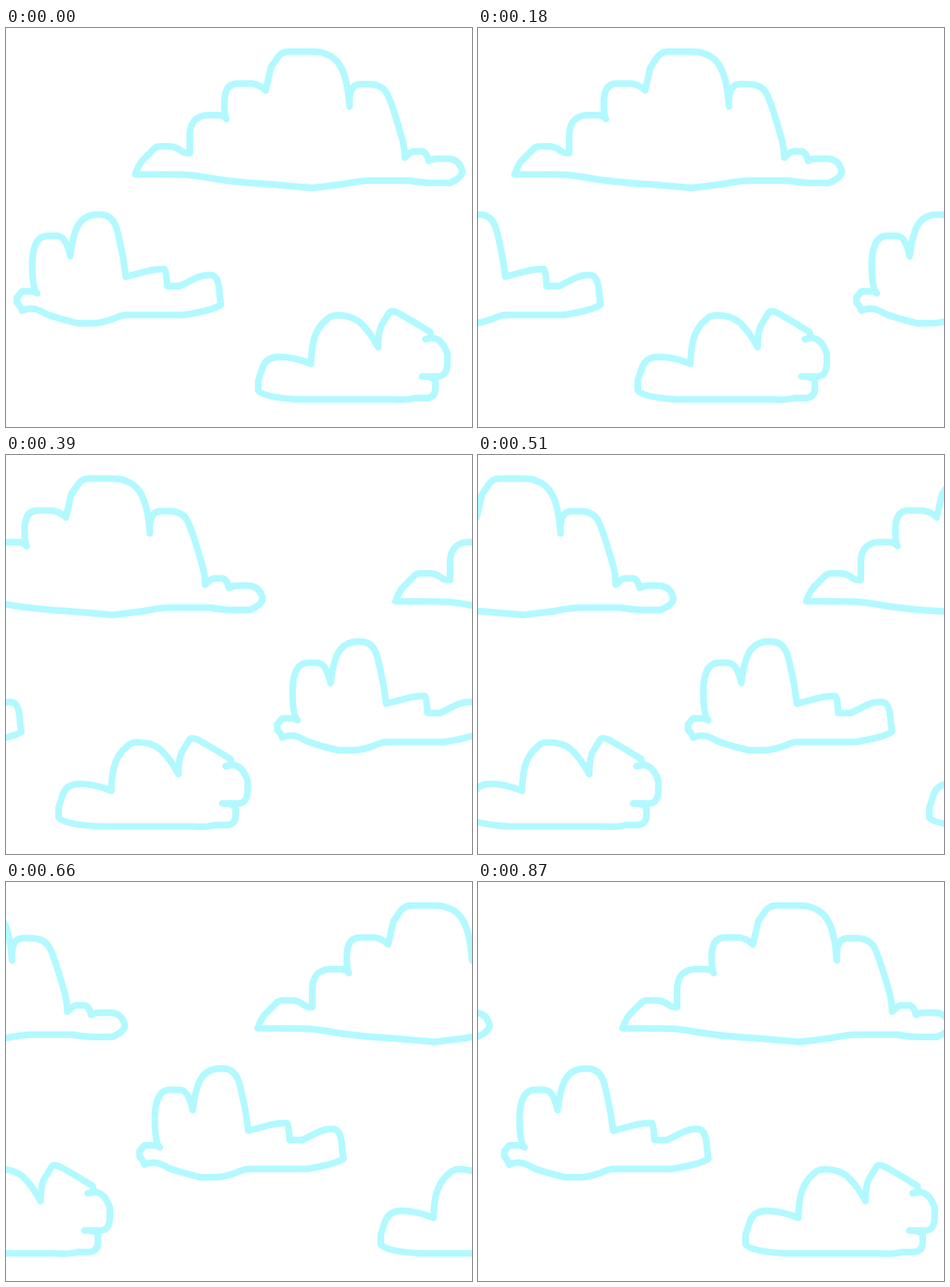
These frames come from a looping animation (700x600 px, 0.9 s). An HTML page:

```html
<!DOCTYPE html>
<html lang="en">
<head>
<meta charset="utf-8">
<title>Drifting clouds</title>
<style>
  html, body { margin: 0; width: 100%; height: 100%; overflow: hidden; background: #fff; }
  svg { display: block; }
</style>
</head>
<body>
<svg width="700" height="600" viewBox="0 0 700 600" fill="none" stroke="#b2f9ff"
     stroke-width="10" stroke-linecap="round" stroke-linejoin="round">
  <g id="strip">
    <g id="clouds">
      <path d="M194 220Q200 204 206 198L221 183Q225 178 231 178H246Q255 178 265 186Q270 189 276 188V165
        Q275 133 302 131H319Q328 132 331 137Q328 130 328 118V112Q328 84 347 83.5H369Q382 85 390 94
        L398 59L409 43Q414 36 424 35.5H459Q473 35.5 477 38Q495 43 503 59Q513 76 516 118
        Q514 85 532 84.5H546Q567 85 574 102Q582 120 596 170Q599 182 599 195Q608 186 612 185.5H625
        Q632 187 635 200Q640 196.5 648 196.5H665Q682 198 685.5 216Q684 226 666 233H637
        Q618 232 607 229.5H544Q530 230 505 235L460 240.5Q430 238 397 235Q340 232 300 224.5
        Q275 220.5 264 220.5Z"/>
      <path d="M47 399Q40 393 39.5 360V352Q41 313 62 312.5H77Q90 313 96.5 343Q100 314 107 299
        Q117 280 139 280.5Q159 279 166 301Q170 315 176 346L180 374L216 364.5Q228 362 238 362.5
        Q241 366 242 388H261L284 376.5Q296 371 306 371.5Q320 370 321 402L323 416Q313 424 268 431.5H182
        Q175 431 162 437Q143 444 131 444H108Q75 436 60 430Q47 422 38 422Q30 422 24 425
        Q23 420 16.5 413V405L24 396H36Q43 396 47 399"/>
      <path d="M458 505Q435 495 412 494.5Q390 494 385 512L379 530V545Q386 555 437 558.5H580
        Q600 560 614 556.5H632Q645 555 645 542V531Q643 524 625 524H645Q663 526 663 503V490
        Q655 466 639 466L630 468L639 466L637 457Q615 443 590 429Q578 423 575 429L564 447
        Q559 458 559 480Q545 454 531 442Q518 432 498 432Q487 432 482 438Q467 450 462 470
        Q459 482 458 505"/>
    </g>
    <use href="#clouds" x="691"/>
  </g>
</svg>
<script>
  const LOOP = 900, STEP = 30, WIDTH = 691;
  const strip = document.getElementById('strip');

  function draw() {
    const tick = Math.floor(performance.now() % LOOP / STEP);
    const shift = Math.ceil(tick * STEP * WIDTH / LOOP);
    strip.setAttribute('transform', `translate(${-shift})`);
    requestAnimationFrame(draw);
  }
  draw();
</script>
</body>
</html>
```
